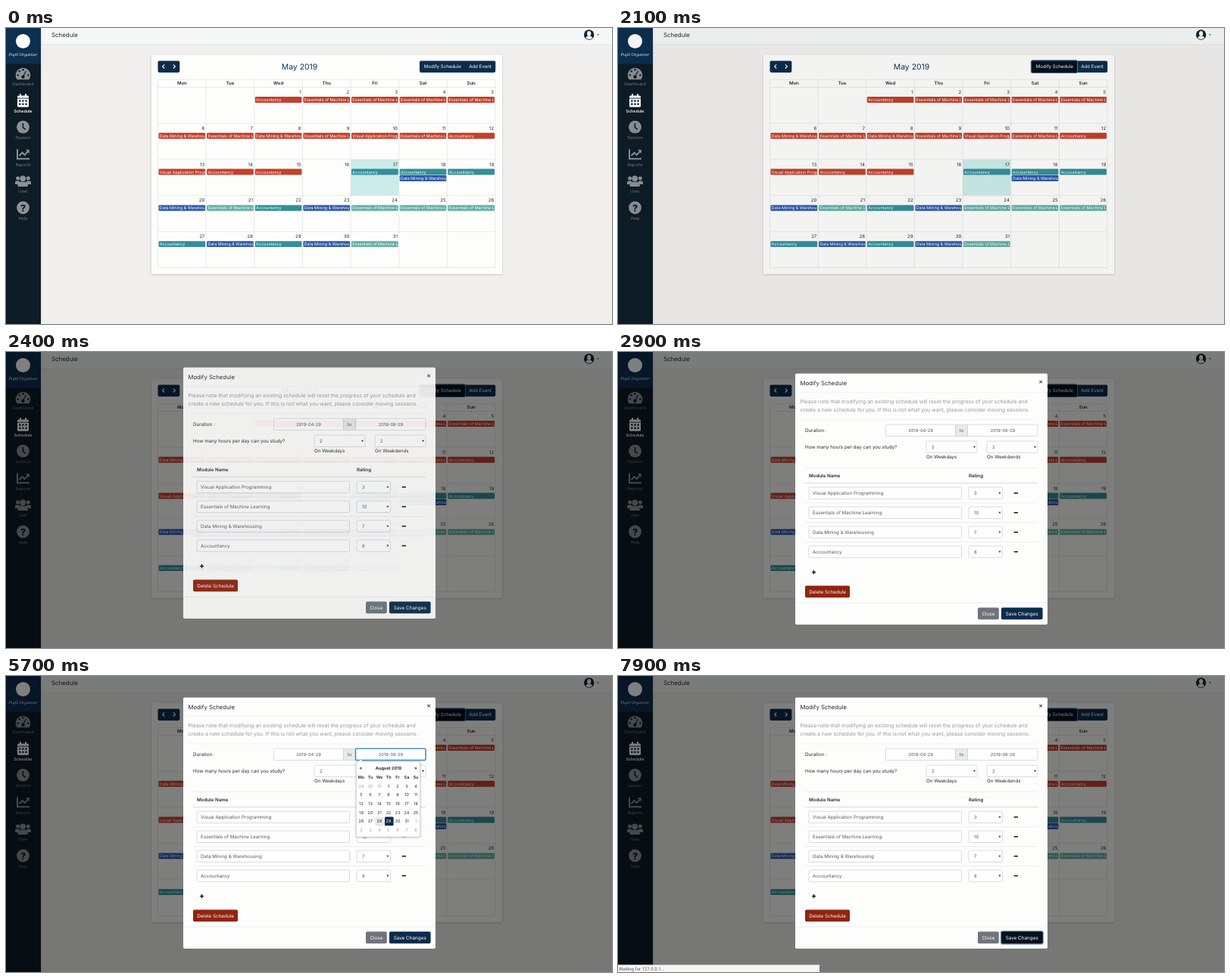
An HTML page that plays this animation: 800x392 px, repeating every 8 s.

```html
<!DOCTYPE html>
<html lang="en">
<head>
<meta charset="utf-8">
<title>Schedule</title>
<style>
  html, body { margin: 0; width: 100%; height: 100%; overflow: hidden; background: #f0efed; }
  svg { display: block; width: 800px; height: 392px; }
  text { font-family: Inter, "Open Sans", sans-serif; text-rendering: geometricPrecision; white-space: pre; }
</style>
</head>
<body>
<svg id="stage" viewBox="0 0 800 392" xmlns="http://www.w3.org/2000/svg"></svg>
<script>
const NAVY = '#0b2c4c', INK = '#26292c', LINE = '#dfe2e3';

// Drawing helpers; text is placed by its vertical centre.
const rect = (x, y, w, h, fill, more = '') =>
  `<rect x="${x}" y="${y}" width="${w}" height="${h}" fill="${fill}" ${more}/>`;
const circle = (x, y, r, fill, more = '') =>
  `<circle cx="${x}" cy="${y}" r="${r}" fill="${fill}" ${more}/>`;
const path = (d, stroke, width = 1, more = '') =>
  `<path d="${d}" fill="none" stroke="${stroke}" stroke-width="${width}" ${more}/>`;
const shape = (d, fill) => `<path d="${d}" fill="${fill}"/>`;
const text = (x, y, size, str, fill = INK, more = '') =>
  `<text x="${x}" y="${(y + size * 0.36).toFixed(2)}" font-size="${size}" fill="${fill}" ${more}>${str.replace(/&/g, '&amp;')}</text>`;
const MID = 'text-anchor="middle"', END = 'text-anchor="end"', BOLD = 'font-weight="600"';
const hline = (x1, x2, y, color = LINE, w = 0.6) => path(`M${x1} ${y}H${x2}`, color, w);

function sidebar() {
  const gray = '#8d9194', dark = '#081c28';
  const labels = [['Dashboard', 74], ['Schedule', 110], ['Session', 145.2], ['Reports', 180.7], ['User', 216.3], ['Help', 251.8]];
  let s = rect(0, 0, 46, 392, dark, 'filter="url(#soft)"') + rect(0, 0, 46, 47.5, '#0e2f50');
  s += circle(22.5, 17.5, 9.5, '#fff');
  s += `<text x="22.5" y="37" font-size="5.9" fill="#e8eef2" text-anchor="middle" font-style="italic" style="font-family:'Liberation Serif',serif">Pupil Organizer</text>`;
  for (const [name, y] of labels) {
    const on = name === 'Schedule';
    s += text(22.5, y, on ? 5.3 : 5.5, name, on ? '#fff' : '#727c83', MID + (on ? ' ' + BOLD : ''));
  }
  // Gauge
  s += shape('M14.6 68.3A9.8 9.8 0 1 1 30.4 68.3Z', gray);
  for (const [x, y] of [[15.7, 62.5], [17.8, 57.2], [22.5, 55.2], [29.3, 62.5]]) s += circle(x, y, 1.2, dark);
  s += path('M22.5 64.5L26.4 57', dark, 1.2) + circle(22.5, 64.8, 2.2, dark);
  // Calendar
  s += rect(15, 89.5, 15, 15.2, '#fff', 'rx="1.5"') + rect(18, 87.2, 2, 4, '#fff') + rect(25, 87.2, 2, 4, '#fff');
  s += rect(15, 92.6, 15, 0.9, dark);
  for (let i = 0; i < 6; i++) s += rect(17.2 + i % 3 * 4.1, 95.4 + (i > 2) * 4.2, 2.3, 2.3, dark);
  // Clock
  s += circle(22.5, 131.2, 8.4, gray) + path('M22.4 126v5.6l3.4 2.7', dark, 1.6);
  // Chart
  s += path('M15 160.5V173.2H31', gray, 2) + path('M17.5 169.3l4-4.2 3.2 3 4.6-5', gray, 2) + shape('M25.8 161.2h5v5z', gray);
  // People
  s += circle(15.6, 199, 2.5, gray) + circle(29.3, 199, 2.5, gray) + circle(22.2, 199.3, 3.9, gray);
  s += shape('M12 207v-2.4q0-2 2-2h3l1.2 1-2 3.4zM33 207v-2.4q0-2-2-2h-3l-1.2 1 2 3.4z', gray);
  s += shape('M15.6 210v-2.6q0-3.6 3.6-3.6h6q3.6 0 3.6 3.6v2.6z', gray);
  // Help
  s += circle(22.5, 238, 8.4, gray) + text(22.5, 238.2, 12.5, '?', dark, MID + ' font-weight="800"');
  return s;
}

function topbar() {
  return rect(46, 0, 754, 21.7, '#f6f8f7') + hline(46, 800, 21.9, '#dcdedd', 0.7) +
    text(60, 9.2, 7.9, 'Schedule') +
    circle(769.7, 9, 6.7, '#0c2233') +
    shape('M765.2 13.3q.5-2.4 3-2.8h3q2.5.4 3 2.8q-4.5 3.6-9 0z', '#f6f8f7') +
    `<ellipse cx="769.7" cy="7.4" rx="2.6" ry="3.3" fill="#f6f8f7"/>` +
    shape('M779.9 8.2h3.2l-1.6 1.8z', '#555');
}

const COL = 63.64, ROW = 47.8, LEFT = 200.5, TOP = 78.5;
const KINDS = {
  A: 'Accountancy', E: 'Essentials of Machine Learning',
  D: 'Data Mining & Warehousing', V: 'Visual Application Programming'
};
const HUES = { A: '#338f99', E: '#60afa4', D: '#2f59ab' };
// One entry per day of the month; "-" is a free day.
const PLAN = 'A E E E E D E D E V E A V A A - A AD A D E A D E E E A D A D E'.split(' ');

function eventBar(x, y, kind, past) {
  return rect(x + 1, y, COL - 2, 7.9, past ? '#c4402c' : HUES[kind], 'rx="1.2"') +
    `<svg x="${x + 1}" y="${y}" width="${COL - 2.3}" height="8">${text(1.3, 4, 5.4, KINDS[kind], '#fff')}</svg>`;
}

function calendar() {
  const right = LEFT + 7 * COL, bottom = TOP + 5 * ROW, grid = '#dcdddc';
  let s = rect(192, 35.8, 463, 290, '#fdfdfc', 'filter="url(#soft)"');
  s += rect(200.5, 43.5, 28.8, 15.4, NAVY, 'rx="1.8"');
  s += path('M209.2 48.3l-2.6 2.6 2.6 2.6M220.8 48.3l2.6 2.6-2.6 2.6', '#fff', 1.1);
  s += text(387.5, 51, 10.4, 'May 2019', '#0d3560', MID);
  s += rect(546, 43.5, 100.2, 15.4, NAVY, 'rx="1.8"');
  s += rect(545.6, 43.1, 60.8, 16.2, 'none', 'id="modRing" rx="2" stroke="#4d6a86" stroke-width="1.6"');
  s += rect(546, 43.5, 60, 15.4, '#03111d', 'id="modHover" rx="1.8"');
  s += text(576.3, 51, 6.15, 'Modify Schedule', '#fff', MID) + text(626, 51, 6.15, 'Add Event', '#fff', MID);
  s += rect(LEFT + 4 * COL, TOP + 2 * ROW, COL, ROW, '#cbece8');
  s += hline(LEFT, right, 68.3, grid);
  for (let r = 0; r <= 5; r++) s += hline(LEFT, right, TOP + r * ROW, grid);
  for (let c = 0; c <= 7; c++) s += path(`M${LEFT + c * COL} 68.3V${bottom}`, grid, 0.6);
  'Mon Tue Wed Thu Fri Sat Sun'.split(' ').forEach((d, c) => {
    s += text(LEFT + (c + 0.5) * COL, 73.2, 6, d, INK, MID + ' ' + BOLD);
  });
  PLAN.forEach((kinds, i) => {
    const cell = i + 2, x = LEFT + cell % 7 * COL, y = TOP + Math.floor(cell / 7) * ROW;
    s += text(x + COL - 1.8, y + 6.3, 6.1, String(i + 1), INK, END);
    if (kinds !== '-') [...kinds].forEach((k, n) => { s += eventBar(x, y + 12.5 + n * 8.4, k, i < 15); });
  });
  return s;
}

const field = (x, y, w) => rect(x, y - 7.7, w, 15.4, '#fefefe', 'rx="1.3" stroke="#c9ced2" stroke-width="0.7"');
const select = (x, y, w, val) => field(x, y, w) + text(x + 7, y + 0.2, 6, val, '#50565b') +
  shape(`M${x + w - 5} ${y - 1}h3l-1.5 2.4z`, '#333');
const button = (x, y, w, label, fill) => rect(x, y - 7.8, w, 15.6, fill, 'rx="1.8"') +
  text(x + w / 2, y, 6.3, label, '#fff', MID);

function modal() {
  let s = rect(234, 28.5, 333, 332.5, '#fdfdfc', 'rx="1.8"');
  s += text(240.5, 41, 7.7, 'Modify Schedule') + text(558, 39.4, 8.5, '×', '#444', MID + ' ' + BOLD);
  s += hline(234, 567, 53.3, '#e7e9e9');
  s += text(240.5, 65.8, 6.9, 'Please note that modifying an existing schedule will reset the progress of your schedule and', '#94989b');
  s += text(240.5, 76.6, 6.9, 'create a new schedule for you. If this is not what you want, please consider moving sessions.', '#94989b');
  s += hline(240.5, 554, 89.8, '#e7e9e9');
  s += text(247, 103.7, 6.3, 'Duration :') + text(247, 125.8, 6.3, 'How many hours per day can you study?');
  s += field(353.5, 103.8, 92) + field(461.5, 103.8, 92.5);
  s += rect(445.3, 96.1, 16.4, 15.4, '#e6eaed', 'stroke="#c9ced2" stroke-width="0.7"');
  s += text(453.5, 103.8, 6, 'to', '#50565b', MID);
  s += text(399.5, 103.8, 5.75, '2019-04-29', '#50565b', MID);
  s += rect(461.5, 96.1, 92.5, 15.4, 'none', 'id="dateRing" rx="1.3" stroke="#3588bb" stroke-width="1.4"');
  s += text(508, 103.8, 5.75, '2019-08-29', '#50565b', MID + ' id="endDate"');
  s += select(407, 125.8, 67, '2') + select(487, 125.8, 67, '2');
  s += text(407, 138.4, 6.2, 'On Weekdays') + text(487, 138.4, 6.2, 'On Weekdends');
  s += hline(247, 554, 153.3) + hline(247, 554, 173.6, '#d8dcde', 1);
  s += text(252, 163.4, 6.2, 'Module Name', INK, BOLD) + text(463, 163.4, 6.2, 'Rating', INK, BOLD);
  [['V', 3], ['E', 10], ['D', 7], ['A', 8]].forEach(([kind, rating], i) => {
    const y = 186.9 + i * 25.9;
    s += field(252, y, 201.5) + text(257, y, 6.2, KINDS[kind], '#50565b');
    s += select(463, y, 44.4, String(rating)) + rect(522.6, y - 0.8, 5.4, 1.5, '#111');
    if (i < 3) s += hline(247, 554, y + 12.9);
  });
  s += path('M255.9 291.6h5.2M258.5 289v5.2', '#111', 1.4);
  s += button(247, 317.4, 59, 'Delete Schedule', '#90240f');
  s += hline(234, 567, 332.2, '#e0e3e4');
  s += button(475, 346.4, 27.8, 'Close', '#6d757b');
  s += rect(505.4, 338, 55.8, 16.8, 'none', 'id="saveRing" rx="2.4" stroke="#829db5" stroke-width="1.7"');
  s += rect(506, 338.6, 54.6, 15.6, NAVY, 'rx="1.8"') + rect(506, 338.6, 54.6, 15.6, '#03111d', 'id="saveHover" rx="1.8"');
  s += text(533.2, 346.4, 6.35, 'Save Changes', '#fff', MID);
  return s;
}

const dayX = c => 469 + c * 12, dayY = r => 145.6 + r * 11.7;

function picker() {
  let s = rect(462.2, 113.2, 84.6, 100, '#fefefe', 'rx="1.6" stroke="#a9adaf" stroke-width="0.6" filter="url(#soft)"');
  s += shape('M465.2 113.4l3-3.1 3 3.1z', '#fefefe') + path('M465.2 113.2l3-3 3 3', '#a9adaf', 0.5);
  s += rect(0, 0, 12, 11.7, '#e8e9e9', 'id="dayHover" rx="1.5"');
  s += text(468.5, 121.8, 6, '«', INK, MID + ' ' + BOLD) + text(540.8, 121.8, 6, '»', INK, MID + ' ' + BOLD);
  s += text(505, 122, 5.6, 'August 2019', INK, MID + ' font-weight="700"');
  'Mo Tu We Th Fr Sa Su'.split(' ').forEach((d, c) => { s += text(dayX(c), 133.8, 5.6, d, INK, MID + ' ' + BOLD); });
  s += rect(500, 186.4, 11.6, 11.8, NAVY, 'rx="1.5"');
  for (let i = 0; i < 42; i++) {
    const n = i - 2, inside = n > 0 && n < 32;
    const label = n < 1 ? n + 31 : inside ? n : n - 31;
    s += text(dayX(i % 7), dayY(Math.floor(i / 7)), 5.5, String(label), n === 29 ? '#fff' : inside ? INK : '#9b9fa1', MID);
  }
  return s;
}

const stage = document.getElementById('stage');
stage.innerHTML =
  `<defs><filter id="soft" x="-10%" y="-10%" width="120%" height="120%"><feDropShadow dx="0" dy="0.6" stdDeviation="1.2" flood-color="#000" flood-opacity="0.22"/></filter></defs>` +
  rect(0, 0, 800, 392, '#f0efed') + topbar() + calendar() + sidebar() +
  rect(0, 0, 800, 392, '#000', 'id="shade"') +
  `<g id="modal">${modal()}</g><g id="picker">${picker()}</g>` +
  `<g id="status">${rect(0, 382.6, 266, 9.4, '#f5f5f4') + hline(0, 266, 382.6, '#bfc0c0')}` +
  `<text x="1" y="389.6" font-size="6" fill="#55585a" style="font-family:Roboto,sans-serif">Waiting for 127.0.0.1...</text></g>`;

const $ = id => document.getElementById(id);

// Opacity over time as [start ms, value]; each value holds until the next.
const FADES = {
  modHover: [[1200, 0.4], [1300, 0.85], [1400, 1]],
  modRing: [[2000, 0.6], [2100, 1]],
  shade: [[2100, 0.04], [2200, 0.34], [2300, 0.5]],
  modal: [[2300, 0.23], [2400, 0.9], [2500, 1]],
  dateRing: [[3900, 0.5], [4000, 1], [5800, 0]],
  picker: [[3900, 1], [6000, 0]],
  dayHover: [[4500, 1]],
  saveHover: [[6600, 0.4], [6700, 0.85], [6800, 1]],
  saveRing: [[7500, 0.6], [7600, 1]],
  status: [[7900, 1]]
};
const DROP = [[2300, -16.5], [2400, -8], [2500, -1.6], [2600, 0]];
// Row of the date under the pointer, in the Wednesday column.
const HOVER_ROW = [[4500, 0], [4700, 1], [4900, 2], [5100, 3], [5300, 4]];

function at(steps, t) {
  let v = 0;
  for (const [start, value] of steps) if (t >= start) v = value;
  return v;
}

function draw(now) {
  const t = now % 8000;
  for (const id in FADES) {
    const v = at(FADES[id], t), el = $(id);
    el.style.opacity = v;
    el.style.display = v ? '' : 'none';
  }
  $('modal').setAttribute('transform', `translate(0 ${at(DROP, t)})`);
  $('dayHover').setAttribute('x', dayX(2) - 6);
  $('dayHover').setAttribute('y', dayY(at(HOVER_ROW, t)) - 5.6);
  $('endDate').textContent = t < 6000 ? '2019-08-29' : '2019-08-28';
}

const began = performance.now();
function tick() {
  draw(performance.now() - began);
  requestAnimationFrame(tick);
}
tick();
</script>
</body>
</html>
```
